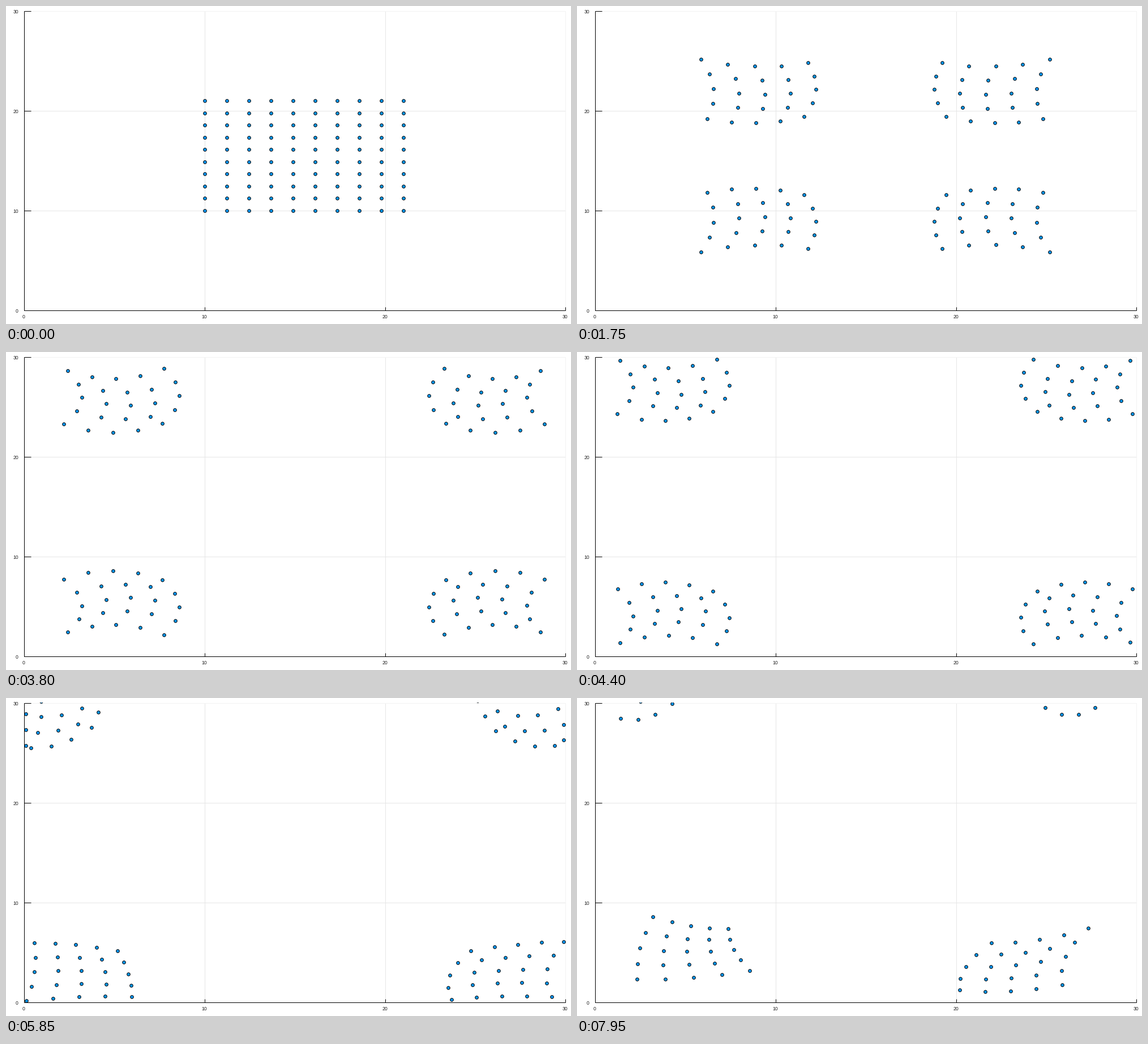
A matplotlib script for the animation above (8000 ms loop, 998 by 561 pixels).

```python
import numpy as np
import matplotlib.pyplot as plt
from matplotlib.animation import FuncAnimation
from matplotlib.patches import Rectangle

W, H, DPI = 998, 561, 100
PX = 72 / DPI                      # one pixel in points
FRAMES, STEP = 160, 50

SPACING = 1.2255                   # lattice constant at rest
CENTRE = 10 + 2 * SPACING          # middle of the lower left 5x5 block
MIRROR = 20 + 9 * SPACING          # x -> MIRROR - x swaps left and right
SPEED = 1.8                        # outward speed of each block
HIT, SETTLED = 5.0, 6.7            # walls reshape the blocks in this span

# shape of a flying block: the lattice bursts, then its sides bow inwards
FLIGHT = [0, 0.9, 2.65, 3.8, 5.0]
STRETCH = [SPACING, 1.47, 1.36, 1.35, 1.31]
SHEAR = [0, 0.08, -0.05, -0.04, -0.05]
BEND = [0, -0.07, -0.20, -0.22, -0.18]
TWIST = [0, -0.05, -0.02, 0.01, -0.02]

# per axis after the walls: centre when settled, speed, and the new shape
# (stretch, shear, bend, twist); an open side just lets the block fly on
OPEN = (-9, -SPEED)
CORNER = (3.91, 1.05, 1.30, -0.04, 0.07, -0.13)
BLOCKS = [  # mirrored in x, mirrored in y, x axis, y axis
    (False, False, CORNER, CORNER),
    (True, False, (5.64, 1.45, 1.38, -0.40, -0.13, -0.02),
     (3.41, 0.39, 1.30, -0.25, 0.09, -0.06)),
    (False, True, (2.30, 1.05, 0.95, -0.15, 0, 0),
     (*OPEN, 1.80, -0.80, -0.30, 0)),
    (True, True, (4.60, 1.33, 0.92, -0.55, 0, 0),
     (*OPEN, 1.75, -0.35, -0.35, 0)),
]

U, V = (g.ravel() for g in np.mgrid[-2:3, -2:3])


def smooth(s):
    s = np.clip(s, 0, 1)
    return s * s * (3 - 2 * s)


def soft_max(a, b, width=0.5):
    return (a + b + np.hypot(a - b, width)) / 2


def along(t, a, b, after):
    """Coordinates on one axis; a counts along it, b across it."""
    place, speed, *settled = after
    burst = 0.176 * np.exp(-t / 0.2)
    inbound = CENTRE - 0.176 + burst - SPEED * t
    outbound = place + speed * (t - SETTLED)
    flying = np.array([np.interp(t, FLIGHT, k)
                       for k in (STRETCH, SHEAR, BEND, TWIST)])
    w = smooth((t - HIT) / (SETTLED - HIT))
    stretch, shear, bend, twist = flying + w * (np.array(settled) - flying)
    return (soft_max(inbound, outbound) + stretch * a + shear * b
            + bend * (b * b - 2) + twist * a * b)


def positions(t):
    xs, ys = [], []
    for flip_x, flip_y, x_axis, y_axis in BLOCKS:
        x, y = along(t, U, V, x_axis), along(t, V, U, y_axis)
        xs.append(MIRROR - x if flip_x else x)
        ys.append(MIRROR - y if flip_y else y)
    # particles are held by the side walls and the floor
    x = np.clip(np.concatenate(xs), 0.1, 29.9)
    y = np.maximum(np.concatenate(ys), 0.15)
    return x, y


def to_px(x, y):
    """Chart values to whole pixels."""
    return (np.floor(32.5 + 31.88 * np.asarray(x)),
            np.floor(537.6 - 17.605 * np.asarray(y)))


fig = plt.figure(figsize=(W / DPI, H / DPI), dpi=DPI, facecolor="white")
ax = fig.add_axes([0, 0, 1, 1])
ax.set_xlim(0, W)
ax.set_ylim(H, 0)
ax.axis("off")


def line(xs, ys, color, z):
    ax.plot(xs, ys, color=color, lw=PX, zorder=z, solid_capstyle="butt")


left, bottom = to_px(0, 0)
right, top = to_px(30, 30)
font = dict(family="Liberation Sans", fontsize=8.6 * PX, color="#222222")

for n in (0, 10, 20, 30):
    gx, gy = to_px(n, n)
    tone = "#f3f3f3" if n == 30 else "#e6e6e6"
    line([gx, gx], [top, bottom], tone, 1)
    line([left, right], [gy, gy], tone, 1)
    line([gx, gx], [bottom, bottom - 6], "black", 2)
    line([left, left + 12], [gy, gy], "black", 2)
    ax.text(gx - 0.6, 547.5, str(n), ha="center", va="center_baseline", **font)
    ax.text(22, gy + 0.2, str(n), ha="right", va="center_baseline", **font)
line([left, left], [top, bottom], "black", 2)
line([left, right], [bottom, bottom], "black", 2)

dots, = ax.plot([], [], "o", ms=5.6 * PX, mfc="#009af9", mec="black",
                mew=PX, zorder=3)
dots.set_clip_path(Rectangle((left, top - 1), right - left + 2,
                             bottom - top + 2, transform=ax.transData))


def draw(n):
    dots.set_data(*to_px(*positions(n * STEP / 1000)))
    return dots,


anim = FuncAnimation(fig, draw, frames=FRAMES, interval=STEP, repeat=True,
                     repeat_delay=0, blit=False)
plt.show()
```
